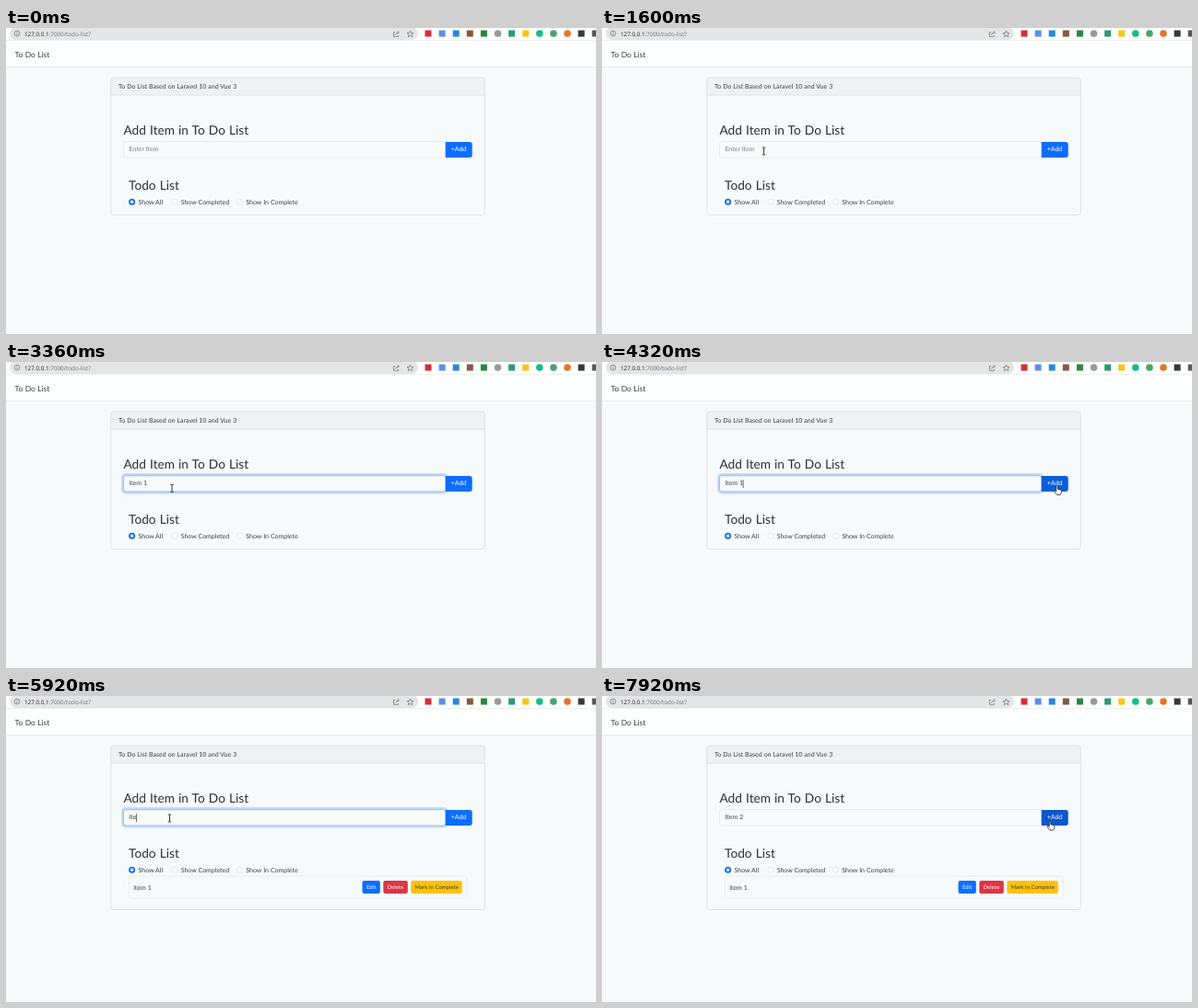
Animation, 640 px wide and 333 px high, one loop 8000 ms. Source, as an HTML page:

```html
<!DOCTYPE html>
<html lang="en">
<head>
<meta charset="utf-8">
<title>To Do List</title>
<style>
  html, body { margin: 0; width: 100%; height: 100%; overflow: hidden; background: #f7fafb; }
  svg { display: block; width: 100%; height: 100%; }
  text { font: 7px Lato, sans-serif; word-spacing: .02em; fill: #3a3f44; white-space: pre; text-rendering: geometricPrecision; }
  .heading { font-size: 13.7px; word-spacing: .04em; fill: #2c3135; }
  .brand { font-size: 8.5px; }
  .url { font: 6.3px "Open Sans", sans-serif; fill: #6b7074; word-spacing: 0; }
  .small { font-size: 6px; }
  .white { fill: #fff; }
  .line { fill: none; stroke: #6a6e72; stroke-width: .7; }
  .edge { fill: none; stroke: #dfe3e5; }
  .faint { fill: none; stroke: #e9edef; }
  .pointer { fill: #fff; stroke: #222; stroke-width: .8; stroke-linejoin: round; }
</style>
</head>
<body>
<svg viewBox="0 0 640 333">
  <!-- Browser bar -->
  <rect width="640" height="13.5" fill="#fff"/>
  <rect x="4" y="-1" width="443" height="14" rx="7" fill="#e3e5e6"/>
  <g class="line">
    <circle cx="12" cy="6" r="2.9"/>
    <path d="M12 5.5V8M12 4v.8"/>
    <path d="M422 4.500h-1.500v4.800h5V8M422.500 7.500q.5-2.700 3.500-2.700M424.600 3l1.800 1.800-1.800 1.800"/>
    <path d="M438.500 3l1 2.300 2.500.2-1.900 1.600.6 2.500-2.200-1.300-2.200 1.300.6-2.500-1.900-1.600 2.500-.2z"/>
  </g>
  <text class="url" x="20" y="8.600"><tspan fill="#202124">127.0.0.1</tspan>:7000/todo-list?</text>
  <g id="extensions"></g>

  <!-- Page header -->
  <rect y="13.500" width="640" height="29" fill="#fdfefe"/>
  <path d="M0 13.500H640" stroke="#e9ebed" stroke-width=".7"/>
  <path d="M0 42.500H640" stroke="#e9ecee"/>
  <text class="brand" x="9.500" y="32">To Do List</text>

  <!-- Card -->
  <path d="M114 73V57q0-3 3-3H516q3 0 3 3V73z" fill="#eff2f3"/>
  <path class="edge" d="M114 73H519"/>
  <rect id="card" class="edge" x="113.700" y="54" width="405.600" height="149.500" rx="3"/>
  <text x="122" y="66">To Do List Based on Laravel 10 and Vue 3</text>
  <text class="heading" x="127.500" y="116">Add Item in To Do List</text>

  <rect id="ring" x="126.300" y="122.300" width="352" height="20" rx="3.500" fill="none" stroke="#c2dbfe" stroke-width="2.400"/>
  <rect id="field" x="127.500" y="123.700" width="349.500" height="17.300" rx="2.500" fill="#f8fafc" stroke-width=".9"/>
  <path id="add" d="M476.700 124H503q2.700 0 2.700 2.700V138.300q0 2.700-2.700 2.700H476.700z"/>
  <text class="white" x="482.700" y="134.300">+Add</text>
  <text id="value" x="133.400" y="134.300"></text>
  <path id="caret" d="M0 128V137" stroke="#333" stroke-width=".7"/>

  <text class="heading" x="133" y="176.200">Todo List</text>
  <circle cx="136.600" cy="189.200" r="3.500" fill="#0d6efd"/>
  <circle cx="136.600" cy="189.200" r="1.600" fill="#fff"/>
  <circle class="faint" cx="183" cy="189.200" r="3.200"/>
  <circle class="faint" cx="253.500" cy="189.200" r="3.200"/>
  <text x="143.500" y="191.700">Show All</text>
  <text x="189.700" y="191.700">Show Completed</text>
  <text x="260.300" y="191.700">Show In Complete</text>

  <g id="item">
    <rect class="faint" x="133.500" y="196" width="366.500" height="24" rx="2.500"/>
    <text x="138.200" y="210.500">item 1</text>
    <rect x="386.500" y="201" width="19.300" height="14" rx="2" fill="#0d6efd"/>
    <rect x="409.300" y="201" width="26.500" height="14" rx="2" fill="#dc3545"/>
    <rect x="439.300" y="201" width="55.500" height="14" rx="2" fill="#ffc107"/>
    <text class="small white" x="391" y="210.200">Edit</text>
    <text class="small white" x="413.500" y="210.200">Delete</text>
    <text class="small" x="443.500" y="210.200">Mark In Complete</text>
  </g>

  <g id="cursor">
    <path id="arrow" class="pointer" d="M0 0V7.700L1.800 6.200 3.100 8.900 4.200 8.400 3 5.700H5.300z"/>
    <path id="beam" fill="none" stroke="#222" stroke-width=".9" d="M-1.700-4H-.5L0-3.600.5-4H1.700M0-3.600V3.600M-1.700 4H-.5L0 3.600.5 4H1.700"/>
    <path id="hand" class="pointer" d="M-.8.700q.8-1.300 1.600 0V3.800l3 .6q1.200.4 1.100 1.600l-.5 2.800-.8 1.200H0L-3 6.500q-.3-1.200.9-1l1.300 1z"/>
  </g>
</svg>
<script>
const $ = id => document.getElementById(id);
const show = (id, visible) => $(id).style.display = visible ? '' : 'none';
const clamp = v => Math.max(0, Math.min(1, v));

const LOOP = 8000, STEP = 80;
const ADDED = 4720;
const FOCUS = [[1640, 4600], [4990, 7800]];
const PRESSES = [[4640, 4720], [7840, 8000]];

// [time, text in the field]
const TYPING = [
  [0, ''], [2240, 'i'], [2320, 'it'], [2480, 'ite'], [2560, 'item'], [2640, 'item '], [2800, 'item 1'],
  [ADDED, ''], [5680, 'I'], [5840, 'It'], [5920, 'Ite'], [6080, 'Item'], [6320, 'Item '], [6560, 'Item 2']
];

// [time, x, y] of the pointer
const PATH = [
  [880, 94, 186], [1040, 121.5, 169.5], [1280, 158, 120], [1680, 180, 137.5],
  [3760, 180, 137.5], [4000, 300, 158], [4240, 488, 137], [4320, 493.5, 134.5],
  [4640, 491, 134], [4720, 480, 134], [4960, 173.5, 132.5], [5200, 177.5, 133],
  [6480, 177.5, 133], [6640, 497, 160], [6960, 497, 160], [7280, 488, 164],
  [7600, 484, 141], [7840, 486, 136], [8000, 486, 136]
];

const EXTENSIONS = [
  ['square', '#d32f35'], ['square', '#5b8fe8'], ['square', '#2389dc'], ['square', '#86583c'],
  ['square', '#26883c'], ['circle', '#96999c'], ['square', '#2b9a77'], ['square', '#f8c514'],
  ['circle', '#13bd83'], ['circle', '#48a568'], ['circle', '#e27625'], ['square', '#34383b'], ['square', '#55585b']
];
$('extensions').innerHTML = EXTENSIONS.map(([shape, color], i) => {
  const x = 458 + i * 15.1;
  return shape === 'circle'
    ? `<circle cx="${x}" cy="6" r="3.8" fill="${color}"/>`
    : `<rect x="${x - 3.5}" y="2.5" width="7" height="7" fill="${color}"/>`;
}).join('');

const within = (spans, t) => spans.find(([from, to]) => t >= from && t < to);

function pointerAt(t) {
  const i = Math.max(1, PATH.findIndex(p => p[0] > t));
  const [t0, x0, y0] = PATH[i - 1], [t1, x1, y1] = PATH[i];
  const k = clamp((t - t0) / (t1 - t0));
  return [x0 + (x1 - x0) * k, y0 + (y1 - y0) * k];
}

function drawPointer(t) {
  const [x, y] = pointerAt(t);
  const inRow = y > 123.5 && y < 141;
  const overAdd = inRow && x >= 477 && x < 506;
  const overField = inRow && x > 127 && x < 477;
  show('cursor', t >= PATH[0][0]);
  $('cursor').setAttribute('transform', `translate(${x} ${y})`);
  show('hand', overAdd);
  show('beam', overField);
  show('arrow', !overAdd && !overField);
  $('add').style.fill = within(PRESSES, t) ? '#0a58ca' : overAdd ? '#0b5ed7' : '#0d6efd';
}

function drawField(t) {
  const [typedAt, text] = TYPING.findLast(entry => entry[0] <= t);
  const focus = within(FOCUS, t);
  const glow = Math.max(...FOCUS.map(([from, to]) =>
    Math.min(clamp((t - from - 40) / 150), clamp((to + 120 - t) / 120))));
  const value = $('value');
  value.textContent = text;
  const caretX = 133.5 + (text ? value.getComputedTextLength() : 0);
  if (!text) value.textContent = 'Enter Item';
  value.style.fill = text ? '#3a3f44' : '#777e84';
  $('ring').style.opacity = glow;
  $('field').style.stroke = glow > .5 ? '#86b7fe' : '#e5e9ec';
  const sinceInput = focus ? t - Math.max(focus[0], typedAt) : 0;
  show('caret', focus && sinceInput % 1060 < 520);
  $('caret').setAttribute('transform', `translate(${caretX} 0)`);
}

function draw(now) {
  const t = Math.floor(now % LOOP / STEP) * STEP;
  drawField(t);
  drawPointer(t);
  show('item', t >= ADDED);
  $('card').setAttribute('height', t >= ADDED ? 178.5 : 149.5);
}

const start = performance.now();
function tick() {
  draw(performance.now() - start);
  requestAnimationFrame(tick);
}
tick();
</script>
</body>
</html>
```
